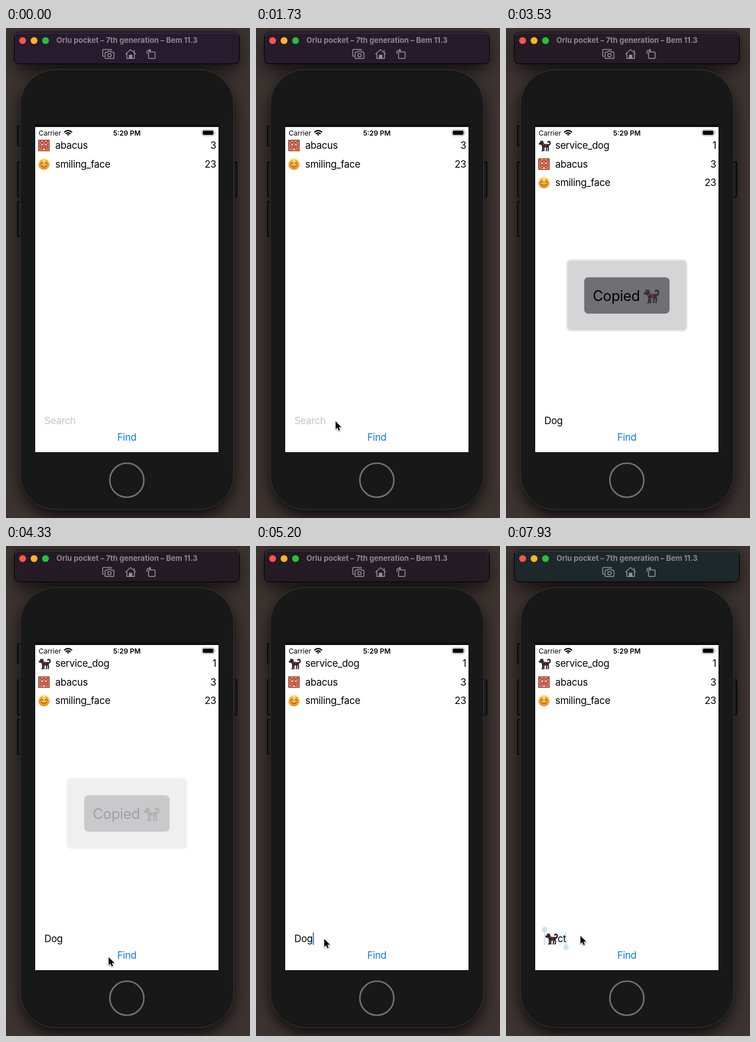
These frames come from a looping animation (426 px wide and 856 px high, 8000 ms). An HTML page:

```html
<!DOCTYPE html>
<html lang="en">
<head>
<meta charset="utf-8">
<title>Emoji search</title>
<style>
  html, body { margin: 0; width: 100%; height: 100%; overflow: hidden; background: #39302d; }
  svg { display: block; width: 426px; height: 856px; }
  text { font: 17px Inter, "Open Sans", sans-serif; letter-spacing: -.3px; white-space: pre; }
  .small { font-size: 12px; letter-spacing: 0; }
  .bold { font-weight: 600; }
  .title { font-size: 13px; font-weight: 700; letter-spacing: 0; fill: #8e8794; }
  .end { text-anchor: end; }
  .icon { fill: none; stroke: #96909a; stroke-width: 1.5; stroke-linejoin: round; }
</style>
</head>
<body>
<svg viewBox="0 0 426 856">
  <defs>
    <filter id="shade" x="-30%" y="-30%" width="160%" height="160%"><feGaussianBlur stdDeviation="14"/></filter>
    <filter id="soft"><feGaussianBlur stdDeviation="1.5"/></filter>
    <linearGradient id="gold" x2="0" y2="1">
      <stop stop-color="#ffe36a"/><stop offset=".55" stop-color="#fbbd3c"/><stop offset="1" stop-color="#e98422"/>
    </linearGradient>

    <g id="dog" fill="none" stroke="#25272b" stroke-linecap="round" stroke-linejoin="round">
      <path d="M17.5 9.5C21.5 9.5 22 4.5 19.5 3.3Q18 2.8 17 4.2" stroke-width="2.4"/>
      <path d="M8 12V19.5H6.8M10.3 13V19.5M15.2 13L14.4 19.5M17.3 12L18.3 15.5L17.6 19.5" stroke-width="2"/>
      <path d="M7.5 9.5L17 9.3L17.4 12L8.5 12.6Z" fill="#25272b" stroke-width="3"/>
      <path d="M2 6.4L4.2 5.6L4.8 2.6L6.2 3.4L8.2 2.8L8.6 7L8 10L5.4 8.2L2.4 8Z" fill="#25272b" stroke-width="1.6"/>
      <path d="M8.2 3.6L9.4 7" stroke="#3a3d42" stroke-width="1.8"/>
      <path d="M7.3 9.6Q9.4 9.3 10.3 7.8H13.4V12.6M9.4 13.7H13" stroke="#b22b2d" stroke-width="1.3"/>
      <circle cx="5.3" cy="5.2" r=".5" fill="#a77a3c" stroke="none"/>
    </g>

    <g id="abacus">
      <rect x=".3" y=".3" width="20" height="20" rx="1" fill="#963f20"/>
      <rect x="2" y="2" width="16.6" height="16.6" fill="#e9d9c5"/>
      <path d="M2 6.7H18.6" stroke="#963f20" stroke-width="1.3"/>
      <g stroke="#c3261d" stroke-width="2.7">
        <path d="M4 2.2V5.2M7.2 3.5V6M10.3 2.2V5.2M13.4 3.5V6M16.6 2.2V5.2"/>
        <path d="M4 8V18M7.2 10V18.4M10.3 8V16M13.4 10V18.4M16.6 8V18" stroke-dasharray="2.2 .6"/>
      </g>
    </g>

    <g id="smile" fill="none" stroke="#71401b" stroke-linecap="round">
      <circle cx="10.3" cy="10.3" r="10" fill="url(#gold)" stroke="none"/>
      <g fill="#f27842" opacity=".65" stroke="none"><circle cx="4.3" cy="11.5" r="2.7"/><circle cx="16.3" cy="11.5" r="2.7"/></g>
      <path d="M4.2 9.2Q6.3 6.2 8.3 9.2M12.3 9.2Q14.3 6.2 16.4 9.2M5.8 13.2Q10.3 17.8 14.8 13.2" stroke-width="1.2"/>
      <path d="M4.8 5.5L7 4.5M13.6 4.5L15.8 5.5" stroke-width=".8"/>
    </g>
  </defs>

  <rect width="426" height="856" fill="#3d3431"/>
  <g filter="url(#shade)">
    <rect x="16" y="16" width="390" height="58" rx="8" opacity=".65"/>
    <rect x="25" y="82" width="372" height="770" rx="64" opacity=".8"/>
  </g>

  <!-- simulator toolbar -->
  <rect id="bar" x="14.5" y="7.5" width="393" height="55" rx="8" stroke="#000"/>
  <path d="M16 14Q17 8.5 23 8.5H399Q405 8.5 406 14" fill="none" stroke="#fff" stroke-opacity=".2"/>
  <circle cx="29" cy="22" r="6" fill="#ff544d"/>
  <circle cx="49" cy="22" r="6" fill="#ffb429"/>
  <circle cx="69" cy="22" r="6" fill="#25c138"/>
  <text class="title" x="88" y="26">Orlu pocket – 7th generation – Bem 11.3</text>
  <g class="icon">
    <path d="M171.5 49.5H170Q168.8 49.5 168.8 48V39Q168.8 37.5 170 37.5H183Q184.5 37.5 184.5 39"/>
    <path d="M173 43.5Q173 42.3 174.2 42.3H177L178.2 40.6H183.2L184.4 42.3H187.3Q188.5 42.3 188.5 43.5V52Q188.5 53.3 187.3 53.3H174.2Q173 53.3 173 52Z"/>
    <circle cx="180.7" cy="47.5" r="3"/>
    <path d="M208.5 45.8L217.5 37.7L226.8 45.8M211 44.5V53.2H224.3V44.5M223.8 42.5V38.5"/>
    <path d="M215.3 53V47.5H219.8V53Z" fill="#96909a"/>
    <rect x="248.8" y="41.7" width="11.5" height="11.5" rx="1.5"/>
    <path d="M246 45V42Q246 39 249 39H252M250.3 36.7L252.7 39L250.3 41.3"/>
  </g>

  <!-- phone -->
  <g fill="#1d1b1b" stroke="#050505" stroke-width="1.5">
    <rect x="20" y="171" width="8" height="35" rx="2"/>
    <rect x="20" y="234" width="8" height="61" rx="2"/>
    <rect x="20" y="303" width="8" height="61" rx="2"/>
    <rect x="394" y="234" width="9" height="61" rx="2"/>
  </g>
  <rect x="25" y="72.5" width="372.500" height="769" rx="62" fill="#181818" stroke="#3b3836"/>
  <rect x="50" y="168" width="322" height="574" fill="#101010"/>
  <rect x="51" y="173" width="320" height="568" fill="#fff"/>
  <circle cx="211" cy="790" r="29.700" fill="#181818" stroke="#737373" stroke-width="2.600"/>

  <!-- status bar -->
  <text class="small" x="57" y="187.500">Carrier</text>
  <g fill="none" stroke="#000" stroke-width="2.200">
    <path d="M101.700 182.200Q108.500 176.200 115.300 182.200M104.200 185Q108.500 181.300 112.800 185"/>
    <path d="M106.300 186L108.500 188.300L110.700 186Q108.500 184.300 106.300 186Z" fill="#000" stroke="none"/>
  </g>
  <text class="small bold" x="211" y="187.500" text-anchor="middle">5:29 PM</text>
  <rect x="341.900" y="177.700" width="22" height="10.600" rx="3" fill="none" stroke="#aaa"/>
  <rect x="343.500" y="179.300" width="18.800" height="7.400" rx="1.800"/>
  <path d="M365.200 181.300Q367.200 183 365.200 184.700Z" fill="#aaa"/>

  <g id="found">
    <use href="#dog" x="56" y="195"/><text x="86" y="211">service_dog</text><text class="end" x="367" y="211">1</text>
  </g>
  <g id="rows">
    <use href="#abacus" x="56" y="195"/><text x="86" y="211">abacus</text><text class="end" x="367" y="211">3</text>
    <use href="#smile" x="56" y="227.500"/><text x="86" y="243.500">smiling_face</text><text class="end" x="367" y="243.500">23</text>
  </g>

  <g id="toast">
    <rect x="106" y="405" width="210" height="124" rx="7" fill="#d5d5d7" filter="url(#soft)"/>
    <rect x="136.500" y="435.500" width="149" height="63.500" rx="7" fill="#707074"/>
    <text x="151.500" y="476.500" style="font-size:25px;letter-spacing:-.4px">Copied</text>
    <use href="#dog" transform="translate(239 454.500) scale(1.290)" opacity=".85"/>
  </g>

  <!-- search field -->
  <g id="select">
    <rect id="fill" x="67" y="675" height="22" fill="#007aff" opacity=".2"/>
    <g fill="#2f8ae6">
      <path d="M66 670H68V697H66Z"/><circle cx="67.500" cy="670" r="4.700"/>
      <g id="grip"><path d="M-1 675H1V701H-1Z"/><circle cy="701" r="4.700"/></g>
    </g>
  </g>
  <use id="pasted" href="#dog" transform="translate(67.500 675) scale(1.040)"/>
  <text id="typed" x="67" y="692"></text>
  <rect id="caret" y="675" width="2.300" height="22" rx="1" fill="#3f8de0"/>
  <text x="211" y="721" text-anchor="middle" fill="#0a7aea">Find</text>

  <g id="cursor">
    <path d="M0 0V14L3.200 11.100L5.400 16.200L7.700 15.200L5.500 10.200H10Z"
      stroke="#fff" stroke-width="1.800" stroke-linejoin="round" paint-order="stroke"
      style="filter:drop-shadow(0 1px 1px #0006)"/>
  </g>
</svg>
<script>
const LOOP = 8000;
const el = id => document.getElementById(id);
const clamp = v => Math.min(1, Math.max(0, v));
const ramp = (t, from, to) => clamp((t - from) / (to - from));
const smooth = u => u * u * (3 - 2 * u);

// Each key: time, then values
const tint = [[0, 39, 27, 46], [1270, 39, 27, 46], [2600, 36, 27, 36], [7000, 36, 27, 36], [7930, 29, 40, 44]];
const firstMove = [[130, 428, 560], [700, 210, 672], [1200, 139, 687], [1800, 139, 687], [2100, 134, 691]];
const secondMove = [[4270, 185, 722], [4600, 121, 681], [4900, 121, 681], [5050, 112, 690], [5400, 130, 681]];

// Each state: time, text, emoji before it, mark shown
const states = [
  [0, '', false, ''], [2270, '', false, 'caret'],
  [3000, 'D', false, 'caret'], [3130, 'Do', false, 'caret'], [3270, 'Dog', false, 'caret'],
  [3530, 'Dog', false, ''], [5050, 'Dog', false, 'caret'], [5270, 'Dog', false, 'select'],
  [5600, '', true, 'caret'], [6930, 'c', true, 'caret'], [7070, 'ct', true, 'caret'],
  [7270, 'ct', true, ''], [7670, 'ct', true, 'select']
];

function mix(keys, t) {
  const i = keys.findIndex(k => k[0] > t);
  if (i < 0) return keys[keys.length - 1].slice(1);
  if (i === 0) return keys[0].slice(1);
  const [a, b] = [keys[i - 1], keys[i]];
  const u = smooth(ramp(t, a[0], b[0]));
  return a.slice(1).map((v, n) => v + (b[n + 1] - v) * u);
}

const blink = age => {
  const u = age % 830;
  return 1 - ramp(u, 330, 470) + ramp(u, 630, 780);
};
const show = (id, alpha) => el(id).setAttribute('opacity', +alpha);
const move = (id, x, y) => el(id).setAttribute('transform', `translate(${x} ${y})`);

function drawField(t) {
  const [since, text, emoji, mark] = states.filter(s => s[0] <= t).pop();
  const typed = el('typed');
  const empty = !text && !emoji;
  const start = emoji ? 90 : 67;
  typed.textContent = empty ? 'Search' : text;
  typed.setAttribute('x', start);
  typed.setAttribute('fill', empty ? '#c4c4c6' : '#000');
  const end = start + (text ? typed.getComputedTextLength() : 0);
  show('pasted', emoji);
  el('caret').setAttribute('x', end);
  show('caret', mark === 'caret' ? blink(t - since) : 0);
  show('select', mark === 'select' ? (emoji ? .25 : 1) * ramp(t, since, since + 200) : 0);
  el('fill').setAttribute('width', end - 67);
  move('grip', end, 0);
}

function draw(t) {
  el('bar').setAttribute('fill', `rgb(${mix(tint, t).map(Math.round)})`);
  const found = t >= 3530;
  show('found', found);
  move('rows', 0, found ? 32.5 : 0);
  show('toast', found ? 1 - ramp(t, 4110, 4460) : 0);
  drawField(t);
  show('cursor', t >= 130 && t < 2590 || t >= 4270);
  move('cursor', ...mix(t < 3000 ? firstMove : secondMove, t));
}

const begin = performance.now();
function tick() {
  draw((performance.now() - begin) % LOOP);
  requestAnimationFrame(tick);
}
tick();
</script>
</body>
</html>
```
